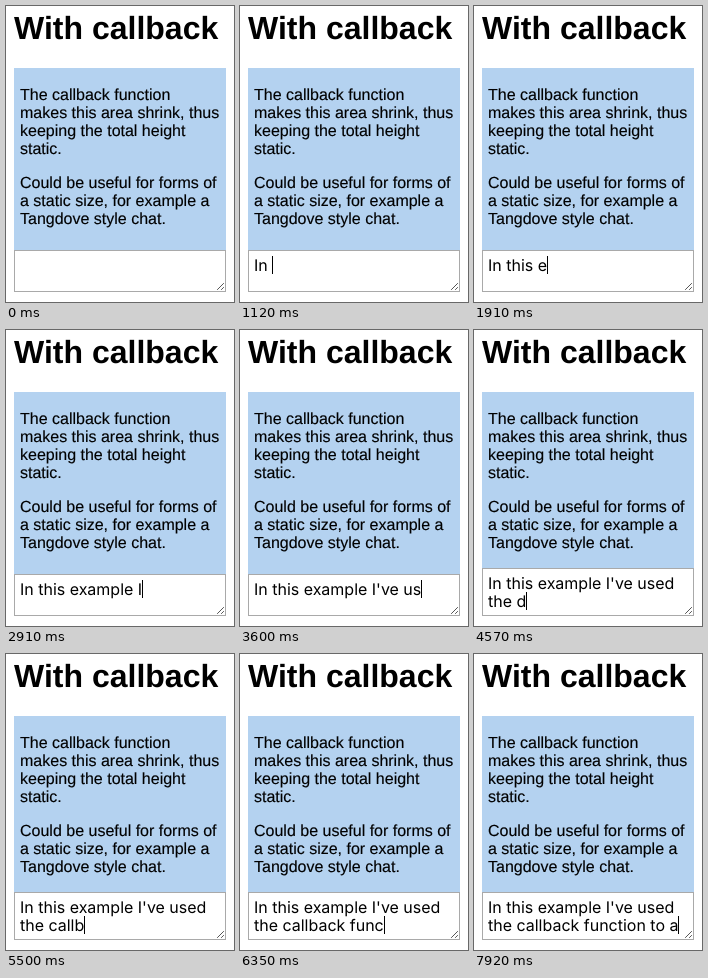
An HTML page for the animation above (8000 ms loop, 228 by 296 pixels).

```html
<!DOCTYPE html>
<html lang="en">
<head>
<meta charset="utf-8">
<title>With callback</title>
<style>
  html, body { margin: 0; width: 100%; height: 100%; overflow: hidden; background: #fff; }
  svg { display: block; }
  text { white-space: pre; text-rendering: geometricPrecision; }
  .title { font: bold 32px "Liberation Sans", Arial, sans-serif; }
  .body { font: 16px "Liberation Sans", Arial, sans-serif; stroke: #000; stroke-width: 0.15px; }
  .input { font: 16px Inter, sans-serif; letter-spacing: -0.01px; }
</style>
</head>
<body>
<svg width="228" height="296" viewBox="0 0 228 296">
  <defs><clipPath id="inner"><rect id="clip" x="9" width="210"/></clipPath></defs>
  <text class="title" x="8" y="33">With callback</text>
  <rect x="8" y="62" width="212" height="200" fill="#b4d2f0"/>
  <g id="note" class="body"></g>
  <rect id="box" x="8.5" width="211" fill="#fff" stroke="#a9a9a9"/>
  <path d="M211.5 283.5l6-6M215.5 283.5l2-2" stroke="#555" stroke-linecap="square" fill="none"/>
  <g class="input" clip-path="url(#inner)">
    <text id="line1" x="14"></text>
    <text id="line2" x="14"></text>
    <rect id="caret" width="1" height="18"/>
  </g>
</svg>
<script>
const LOOP = 8000, LEFT = 14, LINE = 18, BOTTOM = 286;
const WRAP = "In this example I've used ".length;
const $ = id => document.getElementById(id);
const set = (el, attrs) => { for (const k in attrs) el.setAttribute(k, attrs[k]); };

const note = [
  [94, ["The callback function", "makes this area shrink, thus", "keeping the total height", "static."]],
  [182, ["Could be useful for forms of", "a static size, for example a", "Tangdove style chat."]]
];
for (const [top, lines] of note) {
  lines.forEach((words, i) => {
    const el = document.createElementNS("http://www.w3.org/2000/svg", "text");
    set(el, { x: LEFT, y: top + i * LINE });
    el.textContent = words;
    $("note").append(el);
  });
}

// Bursts of keys: first time, last time, keys ("<" deletes, "|" hides the caret)
const bursts = [
  [890, 1410, "In thi"], [1610, 1610, "s"], [1760, 1760, " "], [1910, 1910, "e"],
  [2090, 2090, "x"], [2240, 2710, "ample "], [2910, 2910, "I"], [3090, 3600, "'ve us"],
  [3750, 3750, "e"], [3900, 4220, "d th"], [4310, 4430, "e "], [4570, 4570, "d"],
  [4870, 5080, "<ca"], [5230, 5320, "ll"], [5500, 5500, "b"], [5680, 6350, "ack func"],
  [6530, 6760, "tion"], [6910, 6910, " "], [7510, 7770, "|to "], [7920, 7920, "a"]
];
const keys = bursts.flatMap(([from, to, chars]) => [...chars].map((key, i) =>
  ({ key, at: from + (to - from) * i / Math.max(1, chars.length - 1) })));

function typed(t) {
  let value = "", caret = t >= 410;
  for (const { key, at } of keys) {
    if (at > t) break;
    caret = key !== "|";
    if (key === "<") value = value.slice(0, -1);
    else if (caret) value += key;
  }
  return { value, caret };
}

function draw(t) {
  const { value, caret } = typed(t);
  const grow = Math.round(6 * Math.min(1, Math.max(0, (t - 4290) / 80)));
  const top = 244 - grow;
  const wrapped = value.length > WRAP;
  // Before the box has grown, it scrolls to keep the second line in view
  const scroll = wrapped && grow === 0 ? 1 : 0;
  const y = top + 6 - scroll;

  set($("box"), { y: top + 0.5, height: BOTTOM - top - 1 });
  set($("clip"), { y: top + 1, height: BOTTOM - top - 2 });
  $("line1").textContent = value.slice(0, WRAP);
  $("line2").textContent = value.slice(WRAP);
  set($("line1"), { y: y + 15 });
  set($("line2"), { y: y + 15 + LINE });

  const current = wrapped ? $("line2") : $("line1");
  const width = value ? current.getComputedTextLength() : 0;
  set($("caret"), {
    x: LEFT + Math.round(width),
    y: y + (wrapped ? LINE : 0),
    visibility: caret ? "visible" : "hidden"
  });
}

function tick() {
  draw(performance.now() % LOOP);
  requestAnimationFrame(tick);
}
tick();
</script>
</body>
</html>
```
